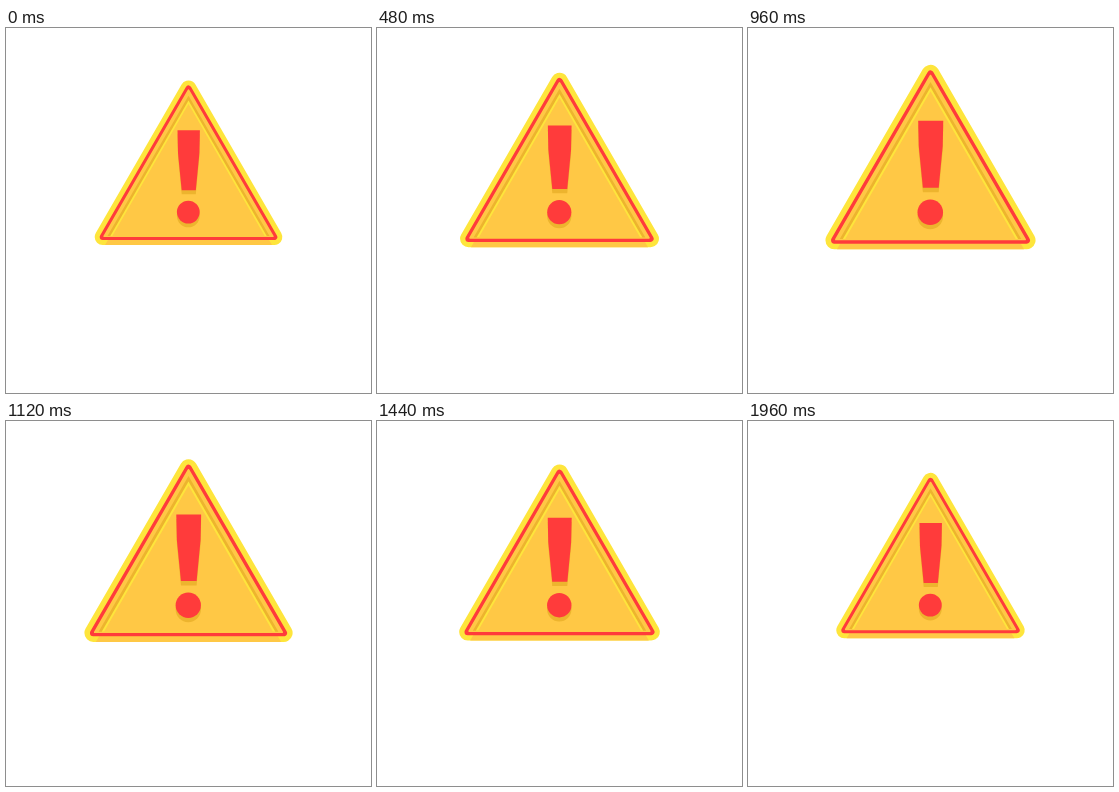
Write an HTML page that moves like this. It is 365 by 365 pixels and loops after 2000 ms.

```html
<!DOCTYPE html>
<html lang="en">
<head>
<meta charset="utf-8">
<title>Warning sign</title>
<style>
  html, body { margin: 0; width: 100%; height: 100%; overflow: hidden; background: #fff; }
  svg { display: block; width: 100vw; height: 100vh; }
</style>
</head>
<body>
<svg viewBox="0 0 365 365">
  <defs>
    <path id="bar" d="M171.5 102.3H193.9L193.4 125 189.8 162.2H175.7L172 125Z"/>
    <circle id="dot" cx="182.3" cy="184.1" r="11.4"/>
  </defs>
  <g id="sign"></g>
</svg>
<script>
  const PERIOD = 2000, GROWTH = 0.125, CENTER = 182.5;
  const YELLOW = '#fee53c', AMBER = '#ffc845', MUSTARD = '#edb42e', RED = '#ff3b3b';
  const sign = document.getElementById('sign');

  // Equilateral triangle: its sides move inwards by `inset`, its base stays at `bottom`.
  function triangle(inset, bottom) {
    const top = 60.5 + 2 * inset;
    const half = (bottom - top) / Math.sqrt(3);
    return `M${CENTER} ${top}L${CENTER + half} ${bottom}H${CENTER - half}Z`;
  }

  function layer(inset, color, { round = 0, bottom = 208 } = {}) {
    return `<path d="${triangle(inset, bottom)}" fill="${color}" stroke="${color}"
      stroke-width="${round * 2}" stroke-linejoin="round"/>`;
  }

  function mark(id, color, dy = 0) {
    return `<use href="#${id}" y="${dy}" fill="${color}"/>`;
  }

  sign.innerHTML =
    layer(0, YELLOW, { round: 8, bottom: 209.1 }) +
    `<path d="M102 212H263L266 217.1H99Z" fill="${AMBER}"/>` +
    layer(0, RED, { round: 3, bottom: 209.1 }) +
    layer(0.8, AMBER, { round: 0.8, bottom: 208.3 }) +
    layer(3.6, MUSTARD) +
    layer(6, YELLOW) +
    layer(7.8, AMBER) +
    mark('bar', MUSTARD, 4) + mark('dot', MUSTARD, 3.8) +
    mark('bar', RED) + mark('dot', RED);

  function draw(time) {
    const phase = (time % PERIOD) / PERIOD;
    const scale = 1 + GROWTH * (1 - Math.abs(1 - 2 * phase));
    sign.setAttribute('transform',
      `translate(${CENTER} ${CENTER}) scale(${scale}) translate(${-CENTER} ${-CENTER})`);
  }

  const start = performance.now();
  function tick() {
    draw(performance.now() - start);
    requestAnimationFrame(tick);
  }
  draw(0);
  requestAnimationFrame(tick);
</script>
</body>
</html>
```
